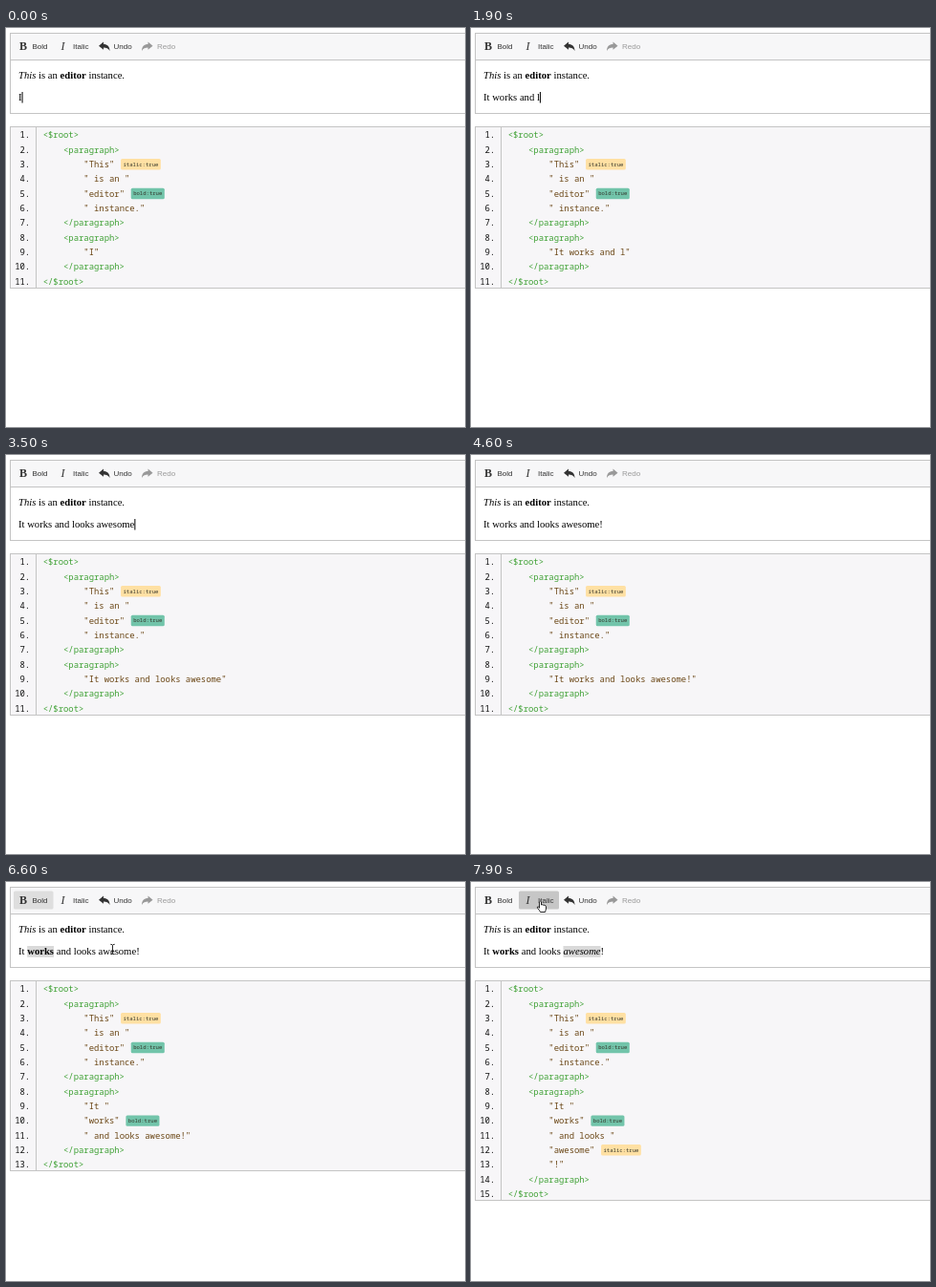
Animation, 480 px wide and 418 px high, one loop 8000 ms. Source, as an HTML page:

```html
<!DOCTYPE html>
<html lang="en">
<head>
<meta charset="utf-8">
<title>Rich text editor and its model</title>
<style>
html, body { margin: 0; width: 100%; height: 100%; overflow: hidden; background: #fff; }
svg { display: block; width: 480px; height: 418px; }
text { white-space: pre; }
.ui { font: 8px "Liberation Sans", Arial, sans-serif; fill: #333; }
.icon { font: bold 12px "Liberation Serif", serif; fill: #333; }
.slant { font-weight: normal; font-style: italic; }
.prose { font: 10.667px "Liberation Serif", "Times New Roman", serif; fill: #000; }
.b { font-weight: bold; }
.i { font-style: italic; }
.code { font: 8.889px "Noto Sans Mono", monospace; }
.num { fill: #111; font-weight: 500; text-anchor: end; }
.tag { fill: #3fa135; }
.str { fill: #6b4716; }
.attr { font: 5.6px "Noto Sans Mono", monospace; fill: #33352a; }
.box { stroke: #c4c4c4; }
</style>
</head>
<body>
<svg viewBox="0 0 480 418" xml:space="preserve">
  <rect class="box" x="4.5" y="5.5" width="490" height="84" fill="#fff"/>
  <rect class="box" x="4.5" y="5.5" width="490" height="28" fill="#f7f7f8"/>
  <rect id="boldBtn" x="8" y="9.5" width="41.5" height="19" rx="1.5"/>
  <rect id="italicBtn" x="50" y="9.5" width="42" height="19" rx="1.5"/>
  <text class="icon" x="14" y="23">B</text>
  <text class="icon slant" x="57.5" y="23">I</text>
  <text class="ui" x="27.5" y="22">Bold</text>
  <text class="ui" x="70" y="22">Italic</text>
  <text class="ui" x="112.5" y="22">Undo</text>
  <text class="ui" x="158" y="22" style="fill:#999">Redo</text>
  <path id="arrow" fill="#333" d="M97 18.7L102 14.6V17C106 17 108.5 19.5 108.5 24C107 21.3 105 20.5 102 20.5V22.8Z"/>
  <path id="redo" fill="#999" transform="translate(250.5) scale(-1 1)"/>
  <text class="prose" x="13" y="53.3"><tspan class="i">This</tspan> is an <tspan class="b">editor</tspan> instance.</text>
  <rect id="sel" y="67" height="11.8" fill="#d9d9d9"/>
  <text id="line" class="prose" x="13" y="76"></text>
  <rect id="caret" y="67" width="1" height="11.5" fill="#000"/>
  <rect id="panel" class="box" x="4.5" y="103.5" width="490" fill="#f7f6f8"/>
  <path id="gutter" class="box" fill="none"/>
  <g id="model" class="code"></g>
  <g id="beam" fill="none">
    <path stroke="#fff" stroke-width="2" stroke-opacity=".6" d="M0 -4V4"/>
    <path stroke="#111" stroke-width=".9" d="M-2.2 -5.2Q0 -5.2 0 -4Q0 -5.2 2.2 -5.2M0 -4V4M-2.2 5.2Q0 5.2 0 4Q0 5.2 2.2 5.2M-1.2 2H1.2"/>
  </g>
  <path id="hand" fill="#fff" stroke="#111" stroke-width=".9" stroke-linejoin="round"
    d="M-1 .8Q0 -.6 1 .8V4Q2 3.2 2.8 4.2Q3.8 3.5 4.5 4.7Q5.8 4.2 6 5.6V8Q5.6 9.5 5 11.5H0Q-.8 9.5 -3 7.2Q-3.6 5.6 -2.2 6L-1 7.2Z"/>
</svg>
<script>
const $ = id => document.getElementById(id);
const LOOP = 8000, STEP = 100, PITCH = 15.333, CHAR = 5.333;
const SENTENCE = "It works and looks awesome!";
const SELECT_WORKS = 5700, BOLD = 6200, SELECT_AWESOME = 6800, ITALIC = 7600;

// pointer stops: time, x, y
const PATH = [
  [5200, 140, 48], [5300, 131, 51], [5500, 74, 67], [5600, 74, 67],
  [5700, 43, 74], [5800, 42, 74], [5900, 41, 70], [6100, 36, 20],
  [6300, 36, 21], [6600, 111.5, 70.5], [6700, 115, 73], [6900, 115, 73],
  [7200, 83, 39], [7400, 73, 23], [7500, 72.5, 20], [8000, 72.5, 20]
];

$("redo").setAttribute("d", $("arrow").getAttribute("d"));

function set(id, attrs) {
  for (const k in attrs) $(id).setAttribute(k, attrs[k]);
}
function show(id, on) {
  $(id).style.display = on ? "" : "none";
}
function esc(s) {
  return s.replace(/</g, "&lt;").replace(/>/g, "&gt;");
}

// when the k-th letter of the sentence appears
function keyTime(k) {
  if (k === 0) return 0;
  if (k <= 13) return 100 + 150 * (k - 1);
  if (k <= 16) return 1900 + 200 * (k - 13);
  if (k <= 25) return 2700 + 100 * (k - 17);
  return 3900;
}

function typed(t) {
  let n = 0;
  while (n < SENTENCE.length && keyTime(n) <= t) n++;
  return SENTENCE.slice(0, n);
}

// runs of the second paragraph: [text, attribute]
function runs(t) {
  if (t < BOLD) return [[typed(t)]];
  const head = [["It "], ["works", "bold"]];
  return head.concat(t < ITALIC
    ? [[" and looks awesome!"]]
    : [[" and looks "], ["awesome", "italic"], ["!"]]);
}

function badge(kind, x, y) {
  const label = kind + ":true", w = label.length * 3.36 + 4.8;
  const fill = kind === "bold" ? "#72c4aa" : "#ffe0a3";
  return `<rect x="${x}" y="${y - 8.8}" width="${w}" height="11.4" rx="1.5" fill="${fill}"/>` +
    `<text class="attr" x="${x + 2.4}" y="${y - 1.3}">${label}</text>`;
}

function drawModel(second) {
  const first = [["This", "italic"], [" is an "], ["editor", "bold"], [" instance."]];
  const rows = [[0, "<$root>"]];
  for (const para of [first, second]) {
    rows.push([1, "<paragraph>"]);
    for (const [s, kind] of para) rows.push([2, `"${s}"`, kind]);
    rows.push([1, "</paragraph>"]);
  }
  rows.push([0, "</$root>"]);
  $("model").innerHTML = rows.map(([depth, s, kind], i) => {
    const x = 38.7 + depth * 4 * CHAR, y = 115.2 + i * PITCH;
    return `<text class="num" x="25.2" y="${y}">${i + 1}.</text>` +
      `<text class="${depth === 2 ? "str" : "tag"}" x="${x}" y="${y}">${esc(s)}</text>` +
      (kind ? badge(kind, x + s.length * CHAR + 6.7, y) : "");
  }).join("");
  const h = Math.round(rows.length * PITCH);
  set("panel", { height: h });
  set("gutter", { d: `M31.5 103.5v${h}` });
}

function drawLine(parts, t) {
  const css = { bold: "b", italic: "i" }, line = $("line");
  line.innerHTML = parts.map(([s, kind]) =>
    `<tspan class="${css[kind] || ""}">${s}</tspan>`).join("");
  const word = t >= SELECT_AWESOME ? "awesome" : t >= SELECT_WORKS ? "works" : "";
  show("sel", word);
  if (word) {
    const at = SENTENCE.indexOf(word);
    const x0 = line.getStartPositionOfChar(at).x;
    const x1 = line.getEndPositionOfChar(at + word.length - 1).x;
    set("sel", { x: x0, width: x1 - x0 });
  }
  const idle = t - keyTime(26);
  show("caret", !word && (idle < 0 || idle % 1000 < 500));
  set("caret", { x: 13 + line.getComputedTextLength() });
}

function pointer(t) {
  if (t < PATH[0][0]) return null;
  const i = PATH.findIndex(p => p[0] > t);
  const [ta, xa, ya] = PATH[i - 1], [tb, xb, yb] = PATH[i];
  const k = (t - ta) / (tb - ta);
  return { x: xa + (xb - xa) * k, y: ya + (yb - ya) * k };
}

function button(id, over, on) {
  set(id, { fill: on ? (over ? "#c6c6c6" : "#dedede") : over ? "#e3e3e3" : "none" });
}

function drawPointer(t) {
  const p = pointer(t);
  const inBar = p && p.y > 9 && p.y < 28;
  const overBold = inBar && p.x > 8 && p.x < 49;
  const overItalic = inBar && p.x > 50 && p.x < 92;
  const hand = overBold || overItalic;
  show("hand", hand);
  show("beam", p && !hand);
  if (p) set(hand ? "hand" : "beam", { transform: `translate(${p.x} ${p.y})` });
  button("boldBtn", overBold, t >= BOLD && t < SELECT_AWESOME);
  button("italicBtn", overItalic, t >= ITALIC);
}

let last = -1;
function frame() {
  const t = Math.floor(performance.now() % LOOP / STEP) * STEP;
  if (t !== last) {
    last = t;
    const parts = runs(t);
    drawModel(parts);
    drawLine(parts, t);
    drawPointer(t);
  }
  requestAnimationFrame(frame);
}
frame();
</script>
</body>
</html>
```
